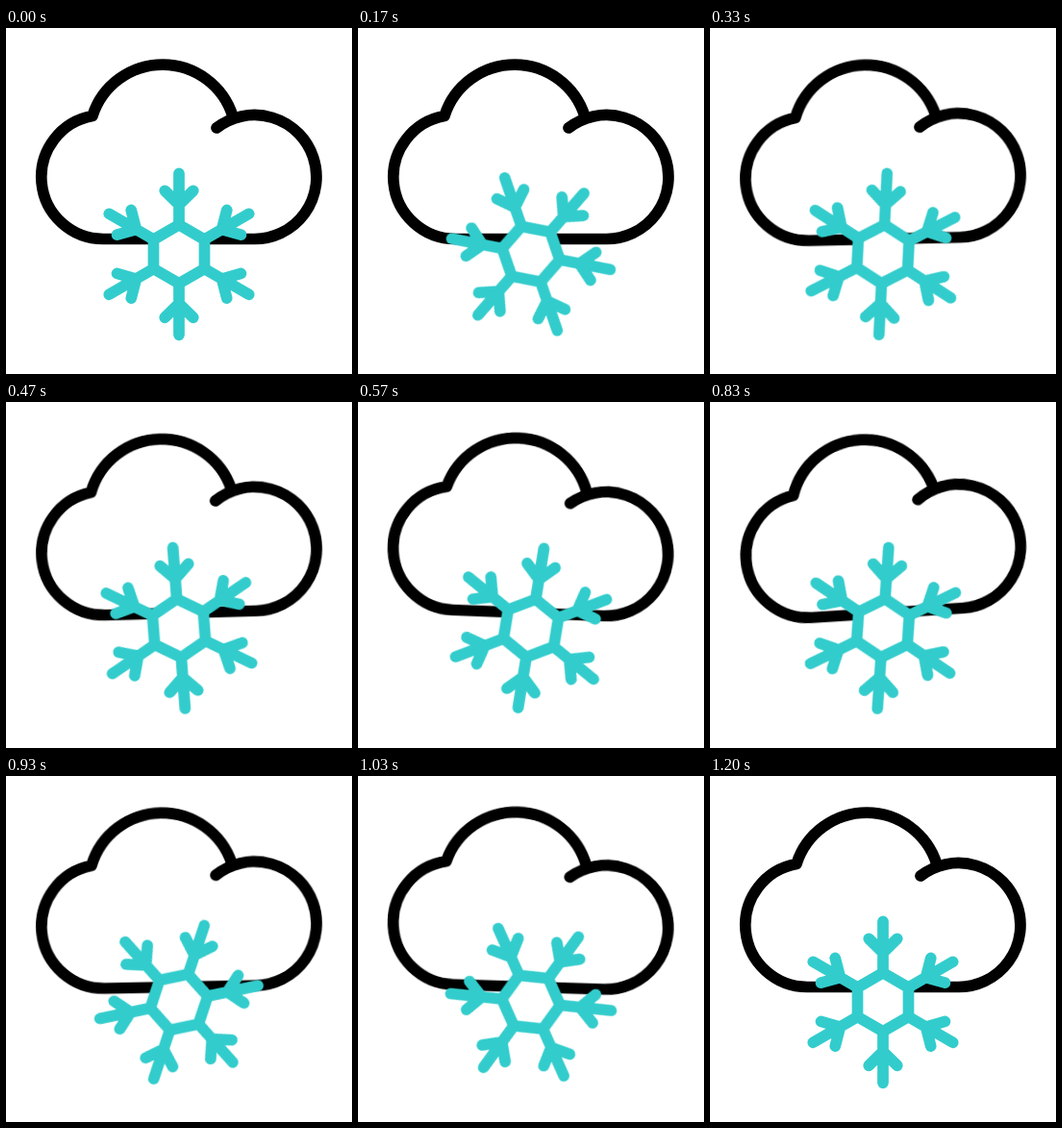
Write an HTML page without scripts that moves like this. It is 360 px wide and 360 px high and loops after 1.67 s.

```html
<!DOCTYPE html>
<html lang="en">
<head>
<meta charset="utf-8">
<title>Snow cloud</title>
<style>
  html, body {
    margin: 0;
    height: 100%;
    overflow: hidden;
    background: #fff;
  }
  svg {
    display: block;
    width: 100%;
    height: 100%;
    fill: none;
    stroke-width: 11.7;
    stroke-linecap: round;
    stroke-linejoin: round;
  }
  .cloud, .flake {
    animation: 1670ms cubic-bezier(.333, 0, .667, 1) infinite;
  }
  .cloud {
    stroke: #000;
    transform-origin: 180px 148px;
    animation-name: rock;
  }
  .flake {
    stroke: #3cc;
    transform-origin: 180px 235.3px;
    animation-name: spin;
  }
  .core { fill: #fff; }

  @keyframes rock {
    0%, 12% { transform: rotate(0deg); }
    26% { transform: rotate(-2.1deg); }
    38% { transform: rotate(3.6deg); }
    50% { transform: rotate(-3.6deg); }
    62% { transform: rotate(1.8deg); }
    72%, 100% { transform: rotate(0deg); }
  }
  @keyframes spin {
    0% {
      transform: rotate(0deg);
      animation-timing-function: cubic-bezier(.355, 0, .566, 1);
    }
    35.2% { transform: rotate(189.5deg); }
    72%, 100% { transform: rotate(0deg); }
  }
</style>
</head>
<body>
<svg viewBox="0 0 360 360">
  <path class="cloud" d="M219 104A64.5 64.5 0 1 1 258 219.5H102A64.5 64.5 0 0 1 90 91.5A76.5 76.5 0 0 1 236 92"/>
  <g class="flake">
    <g transform="translate(180 235.3)">
      <path class="core" d="M0-30.5L26.5-15.2V15.2L0 30.5L-26.5 15.2V-15.2Z"/>
      <path id="arm" d="M0-30.5V-84M-14.8-66L0-51.5L14.8-66"/>
      <use href="#arm" transform="rotate(60)"/>
      <use href="#arm" transform="rotate(120)"/>
      <use href="#arm" transform="rotate(180)"/>
      <use href="#arm" transform="rotate(240)"/>
      <use href="#arm" transform="rotate(300)"/>
    </g>
  </g>
</svg>
</body>
</html>
```
